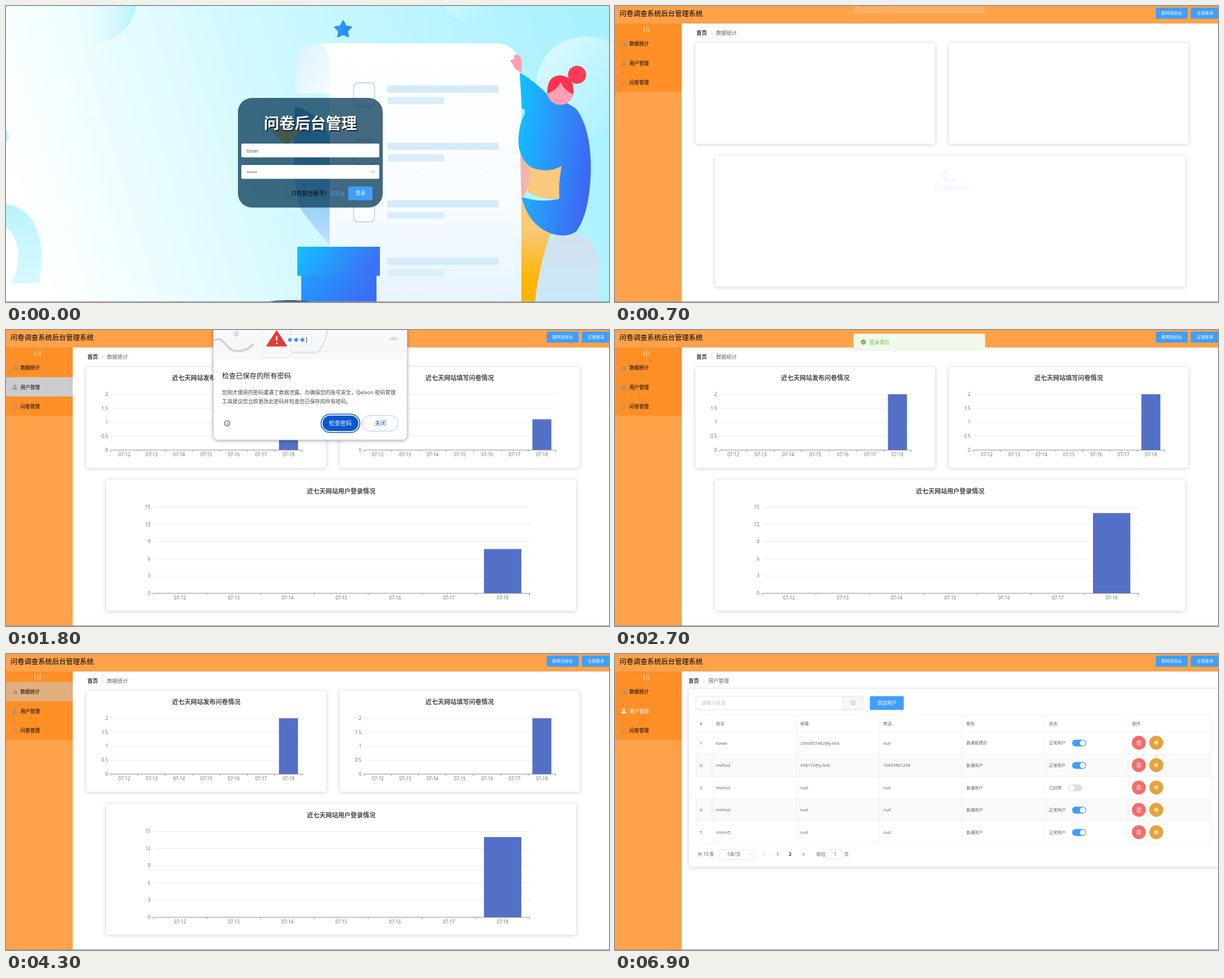
Animation of 1066 by 525 pixels, one loop 8 s. Source, as an HTML page:

```html
<!DOCTYPE html>
<html>
<head>
<meta charset="utf-8">
<title>问卷后台管理</title>
<style>
html, body { margin: 0; width: 100%; height: 100%; overflow: hidden; background: #fff; }
svg { display: block; width: 1066px; height: 525px; }
text { font-family: "Noto Sans", "Noto Sans CJK SC", sans-serif; white-space: pre; }
.bar { transform-box: fill-box; transform-origin: 50% 100%; }
#ring { transform-box: fill-box; transform-origin: 50% 50%; }
.card { filter: drop-shadow(0 1.5px 3.5px rgba(0,0,0,.17)); }
</style>
</head>
<body>
<svg id="stage" viewBox="0 0 1066 525" xmlns="http://www.w3.org/2000/svg"></svg>
<script>
const LOOP = 8000, BLUE = '#409eff';
const list = (n, fn) => Array.from({ length: n }, (_, i) => fn(i)).join('');
const rect = (x, y, w, h, fill, more = '') =>
  `<rect x="${x}" y="${y}" width="${w}" height="${h}" fill="${fill}" ${more}/>`;
const disc = (x, y, r, fill, more = '') => `<circle cx="${x}" cy="${y}" r="${r}" fill="${fill}" ${more}/>`;
const path = (d, fill, more = '') => `<path d="${d}" fill="${fill}" ${more}/>`;
const line = (d, color, w = 1, more = '') => path(d, 'none', `stroke="${color}" stroke-width="${w}" ${more}`);
// y is the middle of the line of text
const text = (x, y, size, str, fill, more = '') =>
  `<text x="${x}" y="${(y + size * .36).toFixed(2)}" font-size="${size}" fill="${fill}" ${more}>${str}</text>`;
const mid = 'text-anchor="middle"', bold = 'font-weight="700"';
const grad = (id, dir, ...stops) => {
  const [x1, y1, x2, y2] = dir;
  return `<linearGradient id="${id}" x1="${x1}" y1="${y1}" x2="${x2}" y2="${y2}">` +
    stops.map(([o, c, a = 1]) => `<stop offset="${o}" stop-color="${c}" stop-opacity="${a}"/>`).join('') +
    '</linearGradient>';
};

const defs = '<defs>' +
  grad('sky', [0, .55, 1, .4], [0, '#fff'], [.12, '#f4feff'], [.5, '#cdf8ff'], [1, '#aaf1ff']) +
  grad('halo', [0, .4, 1, .5], [.3, '#fff', 0], [1, '#b5f3ff']) +
  grad('arc', [0, 0, 0, 1], [0, '#b9f4ff'], [1, '#d8f9ff']) +
  grad('moon', [0, 0, 1, 1], [0, '#e4fbff'], [1, '#b4f3ff', .2]) +
  grad('paper', [0, 0, 0, 1], [0, '#fff'], [.6, '#f8fcff'], [1, '#e6f4ff']) +
  grad('curl', [0, 0, 1, 1], [0, '#d9f3fd'], [1, '#f6faff']) +
  grad('ink', [0, 0, 1, .25], [0, '#13c1ff'], [1, '#3b72f6']) +
  grad('coat', [0, .2, 1, .5], [0, '#10c0ff'], [.45, '#2a98fb'], [1, '#3c68f4']) +
  grad('base', [0, 0, 1, .3], [0, '#1e9dff'], [1, '#3b6ff4']) +
  grad('pants', [0, 0, 0, 1], [.3, '#f9c97c'], [.8, '#ffb400']) +
  grad('stone', [0, 0, 0, 1], [0, '#d4e0ee'], [1, '#c9e9f8']) +
  grad('pen', [0, 0, 0, 1], [0, '#3f9bf0'], [.5, '#7fc4f7'], [1, '#bfe2fb']) +
  '</defs>';

function star(cx, cy, r) {
  const pts = list(10, i => {
    const a = (i / 5 - .5) * Math.PI, k = i % 2 ? r * .5 : r;
    return `${(cx + k * Math.cos(a)).toFixed(1)},${(cy + k * Math.sin(a)).toFixed(1)} `;
  });
  return `<polygon points="${pts}" fill="url(#ink)" stroke="#2b93fb" stroke-width="3" stroke-linejoin="round"/>`;
}

function scenery() {
  return rect(0, 0, 1066, 525, 'url(#sky)') +
    disc(148, -16, 84, 'url(#halo)') + disc(-10, 231, 15, '#b9f4ff') +
    path('M0 352C40 354 63 398 63 440Q63 470 58 492H9Q22 470 22 440Q20 408 0 392Z', 'url(#arc)') +
    disc(813, -9, 36, 'url(#moon)') + disc(1024, 141, 87, 'url(#moon)') +
    path('M930 525Q942 404 992 402Q1050 408 1050 470L1046 525Z', 'url(#stone)') +
    star(596, 42, 15) +
    path('M511 178Q560 194 573 235V425Q540 388 519 357Q503 300 511 178Z', 'url(#pen)') +
    path('M469 222L497 204L519 224L495 247Z', '#ffb81c') +
    path('M512 155V112Q513 66 553 66Q573 80 573 110V155Z', 'url(#curl)') +
    path('M553 66H866Q911 68 911 122V525H572V108Q572 74 553 66Z', 'url(#paper)') +
    list(3, i => rect(614.5, 136 + i * 102.3, 37, 42.5, '#fbfdff',
      'rx="8" stroke="#c3d6ea" stroke-width="1.8"')) +
    list(4, i => rect(674, 141 + i * 101.8, 197, 12.5, '#d5ebf9', 'rx="1"') +
      rect(674, 161.5 + i * 101.8, 101, 12.5, '#dbeefa', 'rx="3"')) +
    rect(522, 478, 133, 47, 'url(#base)') + rect(515, 427, 146, 51.5, 'url(#ink)') +
    path('M455 525Q500 519 550 525Z', '#123a78') +
    path('M911 340Q925 388 964 402Q944 450 935 525H911Z', 'url(#pants)') +
    path('M908 118Q936 134 960 160Q998 172 1010 185Q1034 220 1034 290Q1032 368 1008 400Q990 412 965 404Q924 390 911 338Q940 350 978 342Q976 315 982 284Q958 298 930 288Q904 270 906 234Q908 205 917 192L917 183L912 182Z', 'url(#coat)') +
    path('M924 284Q955 299 982 284Q976 315 978 342Q950 345 922 330Z', '#f9c97c') +
    path('M909 258Q914 278 926 287Q928 320 911 344Z', '#f4b4ae') +
    path('M911 118Q897 112 896 103L891 97Q894 94 899 94Q896 86 903 86Q912 88 912 105Z', '#ff9fb0') +
    disc(1009.5, 122, 16, '#fb3b58') + disc(980, 152, 23.5, '#ff9fb3') +
    path('M957 155Q956 123 981 123Q1006 126 1003 157Q985 148 981 135Q972 151 957 155Z', '#fb3350');
}

function loginPage() {
  const title = (dx, dy, fill) => text(538 + dx, 208.5 + dy, 27.4, '问卷后台管理', fill, mid + ' ' + bold);
  return scenery() +
    rect(410, 163, 256, 194.5, '#083c5a', 'rx="25" fill-opacity=".76"') +
    title(1.6, 1.6, '#14242e') + title(0, 0, '#fff') +
    rect(416, 244, 244, 24.5, '#fff', 'rx="2"') + rect(416, 282, 244, 24.5, '#fff', 'rx="2"') +
    text(425, 256.5, 8.6, 'tovan', '#606266', 'style="font-family:\'Liberation Sans\',sans-serif"') +
    list(6, i => disc(427 + i * 3.05, 294.6, 1.1, '#606266')) +
    line('M645 294Q649 289.500 653 294Q649 298.500 645 294Z', '#c0c4cc', .8) + disc(649, 294, 1.2, '#c0c4cc') +
    text(504, 332, 9.8, '只有前台账号?', '#000') + text(573, 332.5, 8.6, '去前台', BLUE) +
    rect(605, 320, 43, 24.5, BLUE, 'id="enter" rx="2"') + text(626.5, 332, 8.6, '登录', '#fff', mid);
}

function frame() {
  const names = ['数据统计', '用户管理', '问卷管理'];
  const person = 'M15.500 96.800a2.200 2.200 0 1 1 0 4.400a2.200 2.200 0 1 1 0-4.400M11.200 105.400v-1.200q0-2 2.200-2.200h4.200q2.200.2 2.200 2.200v1.200z';
  const icons = [
    path('M12 67h2v4.500h-2zM15 63.500h2v8h-2zM18 65.500h2v6h-2z', '#8f949c'),
    `<g id="who">${path(person, 'currentColor')}</g>`,
    line('M12.500 131h4l2.500 2.500v6.500h-6.500zM14 135h3.500M14 137.500h3.500', '#8f949c', .8)
  ];
  const button = (x, w, tx, s) => rect(x, 3, w, 19.5, BLUE, 'rx="2"') +
    text(tx, 12.7, 7.4, s, '#fff', 'font-weight="500"');
  return rect(0, 0, 118, 525, '#ffa24a') + rect(0, 0, 1066, 31, '#ffa24a') + rect(0, 31, 118, 121, '#ff8f26') +
    text(8, 13.3, 12.25, '问卷调查系统后台管理系统', '#000') +
    button(956, 56.5, 965.5, '跳转到前台') + button(1018, 56, 1028, '注销登录') +
    line('M51.500 36.500v9.500M56 36.500v9.500M60.500 36.500v9.500', '#fff0d8', 1) +
    names.map((s, i) => rect(0, 49.5 + i * 34.2, 118, 34.2, '#ccc', `id="hover${i}" opacity="0"`) +
      icons[i] + text(25.5, 67.2 + i * 34.2, 8.6, s, '#000', `id="item${i}"`)).join('');
}

const crumbs = (x, s) => text(x, 47.8, 9.2, '首页', '#303133', bold) +
  line(`M${x + 25.2} 45l3 3.200l-3 3.200`, '#c0c4cc', .9) + text(x + 34.7, 47.8, 9.2, s, '#606266');

const card = (x, y, w, h) => rect(x, y, w, h, '#fff', 'rx="2" class="card" stroke="#ebeef5" stroke-width=".6"');

function chart(x0, x1, y0, y1, marks, title, cx, cy, level) {
  const step = (x1 - x0) / 7, gap = (y0 - y1) / (marks.length - 1);
  return text(cx, cy, 11, title, '#464646', mid + ' ' + bold) +
    marks.map((m, i) => {
      const y = y0 - i * gap;
      return (i ? line(`M${x0} ${y}H${x1}`, '#e0e6f1', .8) : '') +
        text(x0 - 4.7, y, 8, m, '#6e7079', 'text-anchor="end"');
    }).join('') +
    rect(x0 + step * 6.153, y0 - (y0 - y1) * level, step * .695, (y0 - y1) * level, '#5470c6', 'class="bar"') +
    line(`M${x0} ${y0}H${x1}` + list(8, i => `M${x0 + i * step} ${y0}v3`), '#6e7079', .8) +
    list(7, i => text(x0 + (i + .5) * step, y0 + 8, 8, '07-' + (12 + i), '#6e7079', mid));
}

function dashboard() {
  const small = [0, .5, 1, 1.5, 2];
  return rect(118, 31, 948, 494, '#fff') + '<g id="scroll">' + crumbs(144, '数据统计') +
    card(142, 65.5, 424, 179) + card(590, 65.5, 424, 179) + card(177, 265.5, 831, 232.5) +
    '<g id="loading">' +
    line('M603 300.500a11 11 0 1 1-22 0a11 11 0 1 1 22 0', BLUE, 1.3, 'id="ring" stroke-dasharray="46 24" stroke-linecap="round"') +
    text(592.3, 323.3, 8.6, '正在获取统计图', BLUE, mid) + '</g><g id="charts">' +
    chart(185, 523.5, 213, 114, small, '近七天网站发布问卷情况', 354, 85.5, 1) +
    chart(633, 971.5, 213, 114, small, '近七天网站填写问卷情况', 802, 85.5, 1) +
    chart(260, 925.5, 467, 314.5, [0, 3, 6, 9, 12, 15], '近七天网站用户登录情况', 592.5, 285.8, 14 / 15) +
    '</g></g>';
}

function usersPage() {
  const cols = [143, 172, 321, 467.5, 614, 760.5, 907, 1054];
  const rows = [
    ['tovan', '2093857462@y.test', 'null', '普通管理员'],
    ['mimo2', '908172@y.test', '10055501234', '普通用户'],
    ['mimo3', 'null', 'null', '普通用户'],
    ['mimo4', 'null', 'null', '普通用户'],
    ['mimo5', 'null', 'null', '普通用户']
  ];
  const cell = (i, y, s) => text(cols[i] + 6.8, y, /[a-z0-9]/.test(s) ? 7.6 : 7.4, s, '#606266');
  const flower = (x, y) => list(6, i => {
    const a = i * Math.PI / 3;
    return disc((x + 2.3 * Math.cos(a)).toFixed(2), (y + 2.3 * Math.sin(a)).toFixed(2), 1.3, 'none', 'stroke="#fff" stroke-width=".7"');
  }) + disc(x, y, 1.2, 'none', 'stroke="#fff" stroke-width=".7"');
  const row = (r, i) => {
    const top = 138 + i * 39.65, y = top + 19.8, off = i === 2, sx = off ? 801 : 808;
    return rect(143, top, 911, 39.65, i % 2 ? '#fafafa' : '#fff', `id="row${i}"`) +
      [String(i + 1), ...r, off ? '已封禁' : '正常用户'].map((s, c) => cell(c, y, s)).join('') +
      rect(sx, y - 5.9, 25, 12.2, off ? '#dcdfe6' : BLUE, 'rx="6.1"') +
      disc(sx + (off ? 6.2 : 18.8), y + .2, 4.9, '#fff') +
      disc(926, y - .4, 12.3, '#f56c6c') + disc(956.8, y - .4, 12.3, '#e6a23c') +
      line(`M922 ${y - 2.800}h8M924.500 ${y - 2.800}v-1.500h3v1.500M923 ${y - 2.800}v6.300h6v-6.300M925.200 ${y - 1}v2.700M926.800 ${y - 1}v2.700`, '#fff', .8) +
      flower(956.8, y - .4);
  };
  const grid = cols.map(x => `M${x} 108.500V336`).join('') + 'M143 108.500H1054' +
    list(6, i => `M143 ${138 + i * 39.65}H1054`);
  const box = (x, y, w, h) => rect(x, y, w, h, '#fff', 'rx="2" stroke="#dcdfe6" stroke-width=".8"');
  return rect(118, 31, 948, 494, '#fff') + crumbs(130, '用户管理') +
    card(130.5, 62, 950, 315.5) + box(143, 75, 295.5, 24) +
    rect(403, 75, 35.5, 24, '#f5f7fa', 'stroke="#dcdfe6" stroke-width=".8"') +
    disc(420.5, 86.5, 3.2, 'none', 'stroke="#909399" stroke-width=".8"') + line('M422.800 88.800l2 2', '#909399', .8) +
    text(152.5, 87, 8.6, '请输入内容', '#c0c4cc') +
    rect(450.5, 74.7, 60, 24.5, BLUE, 'rx="2"') + text(480.5, 87, 8.6, '添加用户', '#fff', mid) +
    rows.map(row).join('') + line(grid, '#ebeef5', .8) +
    ['#', '姓名', '邮箱', '电话', '角色', '状态', '操作'].map((s, i) => cell(i, 123.3, s)).join('') +
    text(146, 355.5, 8, '共 10 条', '#606266') + box(185, 347.3, 61, 17) +
    text(210.500, 355.5, 8, '5条/页', '#606266', mid) + line('M236.500 354.500l2.200 2.200l2.200-2.200', '#c0c4cc', .8) +
    line('M265.500 352.500l-2.800 2.800l2.800 2.800', '#a8abb2', .9) + line('M331.800 352.500l2.800 2.800l-2.800 2.800', '#303133', .9) +
    text(287.7, 355.5, 8.2, '1', BLUE, mid + ' ' + bold) + text(309.5, 355.5, 8.2, '2', '#303133', mid + ' ' + bold) +
    text(356, 355.5, 8.3, '前往', '#606266') + box(375, 347, 27.5, 16.8) +
    text(389, 355.5, 8, '1', '#606266', mid) + text(405, 355.5, 8.3, '页', '#606266');
}

function toast() {
  return rect(422, 7, 232, 29, '#f0f9eb', 'rx="2.500" stroke="#e1f3d8" stroke-width=".8"') +
    disc(439.2, 21.3, 4.4, '#67c23a') + line('M437.200 21.400l1.500 1.500l2.700-2.800', '#fff', 1) +
    text(450, 21.5, 8.6, '登录成功', '#67c23a');
}

function dialog() {
  const asterisk = (x, y, r, color, w) => line(list(3, i => {
    const a = Math.PI * (i / 3 + .5), dx = r * Math.cos(a), dy = r * Math.sin(a);
    return `M${x - dx} ${y - dy}L${x + dx} ${y + dy}`;
  }), color, w);
  const gray = '#d3d5d8';
  return rect(366.5, -20, 342.5, 215, '#fff', 'rx="8" stroke="#c9cbce" stroke-width=".8" style="filter:drop-shadow(0 1px 3px rgba(0,0,0,.35))"') +
    rect(367, -20, 341.5, 72, '#f7f8f9') +
    line('M368 19C384 8 388 34 404 37Q425 39 437 25', '#cfd1d4', 3.5) + asterisk(407, 7, 6, gray, 2) +
    rect(453, -20, 51, 69, '#f8f9fa', 'rx="5" stroke="#dfe1e4"') +
    line('M504.500 0V37.500H570', '#dfe1e4') + line('M505 40.500H550Q562 30 569 0', gray, 1.5) +
    path('M678 18q1-6 7-6q6 0 7 6z', '#dadcdf') +
    rect(488, 8.5, 52, 18.5, '#fff', 'rx="2" stroke="#dadce0"') +
    list(3, i => asterisk(502 + i * 11, 17.5, 4, '#3b78e7', 1.7)) + line('M531.500 12.500v10', '#3b78e7', 1.3) +
    path('M478.500 1.500L496 28.500H461Z', '#e53935', 'stroke="#e53935" stroke-width="1.500" stroke-linejoin="round"') +
    line('M478.500 10.500v8.500M478.500 22v2.800', '#fff', 2.3) +
    text(382, 82, 12.2, '检查已保存的所有密码', '#1f1f1f') +
    text(382, 111, 9.15, '您刚才使用的密码遭遇了数据泄露。为确保您的账号安全，Qelvon 密码管理', '#474747') +
    text(382, 126.3, 9.15, '工具建议您立即更改此密码并检查您已保存的所有密码。', '#474747') +
    disc(391, 165.5, 4.8, 'none', 'stroke="#474747" stroke-width="1.100"') + line('M391 164.700v3.500M391 162.300v1.200', '#474747', 1.2) +
    rect(557, 149.300, 68.5, 32.5, '#fff', 'rx="16.200" stroke="#0b57d0" stroke-width="1.600"') +
    rect(559.5, 151.7, 63.5, 27.6, '#0b57d0', 'rx="13.800"') + text(591, 165.8, 10, '检查密码', '#fff', mid) +
    rect(630, 151.7, 63.5, 27.6, '#fff', 'rx="13.800" stroke="#a8c7fa" stroke-width="1"') +
    text(661.7, 165.8, 9.8, '关闭', '#0b57d0', mid);
}

const group = (id, body) => `<g id="${id}">${body}</g>`;
const stage = document.getElementById('stage');
stage.innerHTML = defs + group('dash', dashboard()) + group('users', usersPage()) + frame() +
  group('toast', toast()) + group('dialog', dialog()) + group('login', loginPage()) +
  rect(0, 524, 1066, 1, '#8d9499');

// keys: [time, value, easing]; the ends are held
function play(sel, prop, keys) {
  const all = [[0, keys[0][1]], ...keys, [LOOP, keys[keys.length - 1][1]]];
  const steps = all.map(([t, v, easing = 'linear']) => ({ offset: t / LOOP, [prop]: v, easing }));
  document.querySelectorAll(sel).forEach(el => el.animate(steps, { duration: LOOP, iterations: Infinity }));
}
const cut = (sel, t, from, to) => play(sel, 'opacity', [[t, from], [t, to]]);
const up = y => `translateY(${y}px)`;
const ENTER = 640, DATA = 1660, CLICK = 5020;

play('#enter', 'fill', [[140, BLUE], [240, '#66b1ff'], [400, '#66b1ff'], [500, '#3a8ee6'], [600, '#66b1ff']]);
cut('#login', ENTER, 1, 0);
cut('#dash', 5050, 1, 0);
cut('#users', 5050, 0, 1);

play('#toast', 'transform', [[660, up(-29), 'ease-out'], [970, up(0)], [3400, up(0), 'ease'], [3700, up(-29)]]);
play('#toast', 'opacity', [[650, 0], [970, 1], [3400, 1], [3680, 0]]);
play('#loading', 'opacity', [[650, 0], [950, 1], [1580, 1], [1740, 0]]);
play('#ring', 'transform', [[ENTER, 'rotate(0deg)'], [DATA, 'rotate(400deg)']]);
cut('#charts', DATA, 0, 1);
play('.bar', 'transform', [[DATA, 'scaleY(0)', 'cubic-bezier(.33,1,.68,1)'], [DATA + 600, 'scaleY(1)']]);
play('#dialog', 'opacity', [[1200, 0], [1380, 1], [2530, 1], [2680, 0]]);
play('#scroll', 'transform', [[3230, up(0), 'ease-out'], [3400, up(-9)], [3500, up(-9), 'ease'], [3690, up(0)]]);

play('#hover0', 'opacity', [[4210, 0, 'ease'], [4500, 1], [4640, 1, 'ease'], [4920, 0]]);
play('#hover1', 'opacity', [[1450, 0, 'ease'], [1740, 1], [2510, 1], [2700, 0],
  [4640, 0, 'ease'], [4920, 1], [CLICK, 1], [CLICK + 310, 0]]);
play('#item1', 'fill', [[CLICK, '#000'], [CLICK + 320, '#fff']]);
play('#who', 'color', [[CLICK, '#8f949c'], [CLICK, '#000'], [CLICK + 320, '#fff']]);
play('#row3', 'fill', [[6050, '#fafafa'], [6200, '#f5f7fa'], [6650, '#f5f7fa'], [6860, '#fafafa']]);
</script>
</body>
</html>
```
